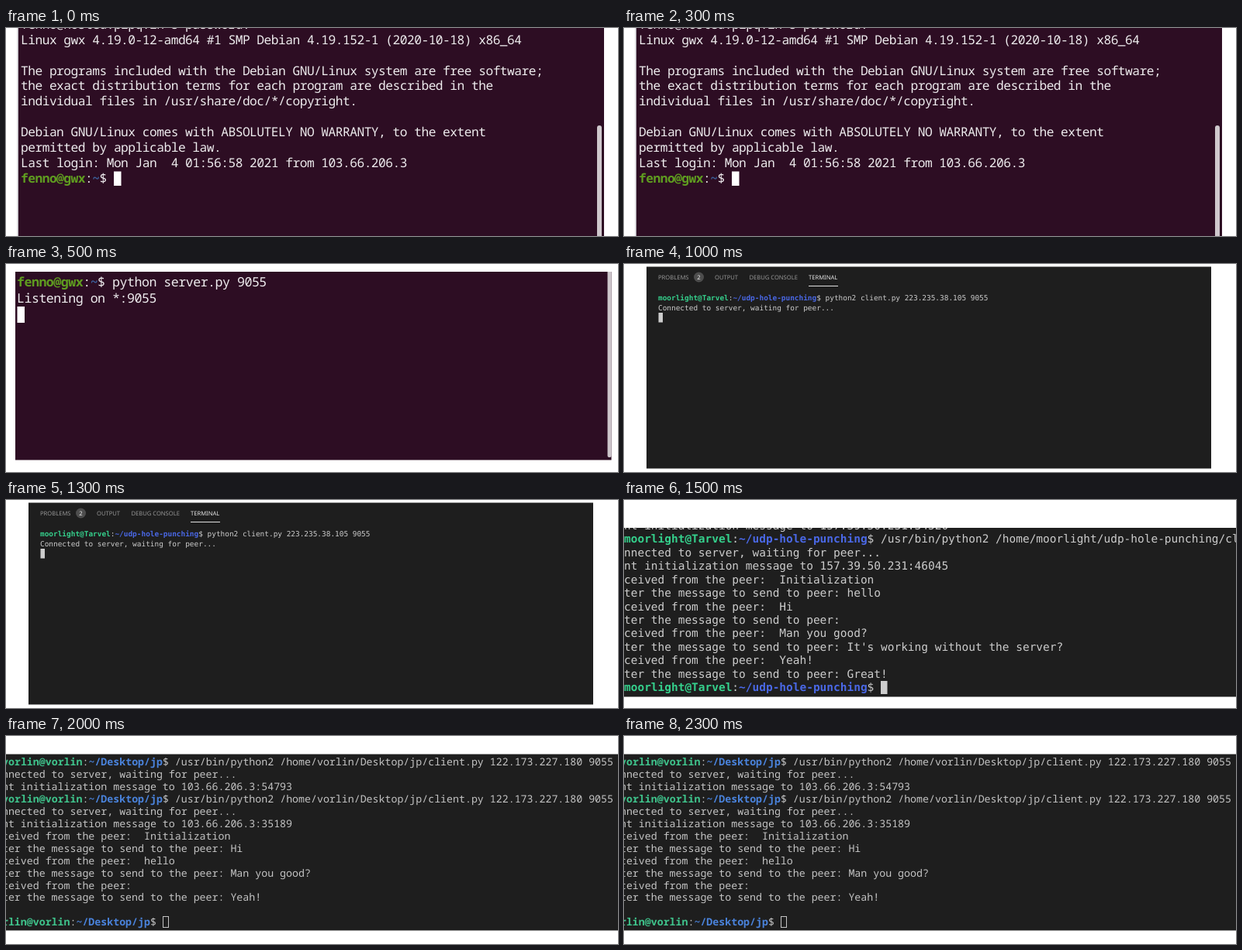
These frames come from a looping animation (789 px wide and 269 px high, 2500 ms). An HTML page with a canvas:

```html
<!DOCTYPE html>
<html lang="en">
<head>
<meta charset="utf-8">
<title>UDP hole punching demo</title>
<style>
  html, body { margin: 0; width: 100%; height: 100%; overflow: hidden; background: #fff; }
  canvas { display: block; }
</style>
</head>
<body>
<canvas id="stage" width="789" height="269"></canvas>
<script>
const ctx = document.getElementById('stage').getContext('2d');
const SCENE_MS = 500;
const NOTO = '"Noto Sans Mono", monospace';
const DEJAVU = '"DejaVu Sans Mono", monospace';

function box(color, x, y, w, h, radius = 0) {
  ctx.fillStyle = color;
  ctx.beginPath();
  ctx.roundRect(x, y, w, h, radius);
  ctx.fill();
}

// Draws one run of text and returns the x where the next run starts.
function write(text, x, y, font, color) {
  ctx.font = font;
  ctx.fillStyle = color;
  ctx.fillText(text, x, y);
  return x + ctx.measureText(text).width;
}

// A line is plain text, or { cmd, dx } for a coloured prompt followed by a command.
function terminal({
  family, size, tracking = 0, x, y, step, color, user, path, green, blue, lines
}) {
  const plain = `${size}px ${family}`;
  const bold = `bold ${plain}`;
  ctx.letterSpacing = `${tracking}px`;
  lines.forEach((line, i) => {
    const base = y + i * step;
    if (typeof line === 'string') {
      write(line, x, base, plain, color);
      return;
    }
    let at = write(user, x + (line.dx || 0), base, bold, green);
    at = write(':', at, base, plain, color);
    at = write(path, at, base, bold, blue);
    write('$ ' + line.cmd, at, base, plain, color);
  });
  ctx.letterSpacing = '0px';
}

const ubuntu = {
  family: NOTO, tracking: -0.5, color: '#eeecee', user: 'fenno@gwx', path: '~',
  green: '#5f9c20', blue: '#3d67a5'
};
const editor = {
  family: DEJAVU, color: '#cccccc', user: 'moorlight@Tarvel', path: '~/udp-hole-punching',
  green: '#35d08c', blue: '#4a68e6'
};

function login() {
  box('#c4c2c8', 14.5, 0, 2, 269);
  box('#2d0d23', 16, 0, 755, 269);
  box('#cfc8cd', 762, 126, 6, 150, 3);
  terminal({
    ...ubuntu, size: 16.22, x: 19, y: 0.8, step: 19.9,
    lines: [
      "fenno@hosted.plpq.in's password:",
      'Linux gwx 4.19.0-12-amd64 #1 SMP Debian 4.19.152-1 (2020-10-18) x86_64',
      '',
      'The programs included with the Debian GNU/Linux system are free software;',
      'the exact distribution terms for each program are described in the',
      'individual files in /usr/share/doc/*/copyright.',
      '',
      'Debian GNU/Linux comes with ABSOLUTELY NO WARRANTY, to the extent',
      'permitted by applicable law.',
      'Last login: Mon Jan  4 01:56:58 2021 from 103.66.206.3',
      { cmd: '' }
    ]
  });
  box('#fff', 139, 185.5, 9.5, 18.5);
}

function server() {
  box('#2d0d23', 12, 10, 768.5, 243.5);
  box('#cdc6cb', 775.5, 10, 5, 240, [0, 0, 2, 2]);
  terminal({
    ...ubuntu, size: 16.62, x: 14, y: 28.5, step: 21.3,
    lines: [{ cmd: 'python server.py 9055' }, 'Listening on *:9055']
  });
  box('#fff', 14.5, 55, 9.5, 21);
}

function client() {
  box('#1e1e1e', 29, 3.5, 728, 261);
  const tab = (name, x, color = '#969696') =>
    write(name, x, 20, '7.6px "Noto Sans", sans-serif', color);
  tab('PROBLEMS', 44);
  box('#4d4d4d', 90, 10.5, 13, 13, 6.5);
  tab('2', 94.3, '#f0f0f0');
  tab('OUTPUT', 117);
  tab('DEBUG CONSOLE', 161.5);
  tab('TERMINAL', 238, '#e7e7e7');
  box('#e0e0e0', 238, 28, 38, 1);
  terminal({
    ...editor, size: 9.44, x: 44, y: 47, step: 12.8,
    lines: [
      { cmd: 'python2 client.py 223.235.38.105 9055' },
      'Connected to server, waiting for peer...'
    ]
  });
  box('#cccccc', 44.5, 63, 5.5, 12.5);
}

function firstPeer() {
  box('#1e1e1e', 0, 36, 789, 218.5);
  ctx.save();
  ctx.beginPath();
  ctx.rect(0, 36, 789, 218.5);
  ctx.clip();
  terminal({
    ...editor, size: 14.47, x: 0, y: 37.8, step: 17.45,
    lines: [
      'nt initialization message to 157.39.50.231:34520',
      { cmd: '/usr/bin/python2 /home/moorlight/udp-hole-punching/client.py' },
      'nnected to server, waiting for peer...',
      'nt initialization message to 157.39.50.231:46045',
      'ceived from the peer:  Initialization',
      'ter the message to send to peer: hello',
      'ceived from the peer:  Hi',
      'ter the message to send to peer:',
      'ceived from the peer:  Man you good?',
      "ter the message to send to peer: It's working without the server?",
      'ceived from the peer:  Yeah!',
      'ter the message to send to peer: Great!',
      { cmd: '' }
    ]
  });
  ctx.restore();
  box('#cccccc', 331, 234, 8.5, 17);
}

function secondPeer() {
  box('#1e1e1e', 0, 23.5, 789, 228);
  const run = {
    cmd: '/usr/bin/python2 /home/vorlin/Desktop/jp/client.py 122.173.227.180 9055',
    dx: 16
  };
  terminal({
    family: NOTO, color: '#c4c4c4', user: 'vorlin@vorlin', path: '~/Desktop/jp',
    green: '#3fc48c', blue: '#4a83dc', size: 13.27, x: -21, y: 38, step: 15.95,
    lines: [
      run,
      'Connected to server, waiting for peer...',
      'Sent initialization message to 103.66.206.3:54793',
      run,
      'Connected to server, waiting for peer...',
      'Sent initialization message to 103.66.206.3:35189',
      'Received from the peer:  Initialization',
      'Enter the message to send to the peer: Hi',
      'Received from the peer:  hello',
      'Enter the message to send to the peer: Man you good?',
      'Received from the peer:',
      'Enter the message to send to the peer: Yeah!',
      '',
      { cmd: '' }
    ]
  });
  ctx.strokeStyle = '#c4c4c4';
  ctx.lineWidth = 1;
  ctx.strokeRect(202.5, 233.5, 7, 14);
}

const scenes = [login, server, client, firstPeer, secondPeer];
const start = performance.now();

function draw() {
  const elapsed = Math.max(0, performance.now() - start);
  ctx.textRendering = 'geometricPrecision';
  box('#fff', 0, 0, 789, 269);
  scenes[Math.floor(elapsed / SCENE_MS) % scenes.length]();
  requestAnimationFrame(draw);
}
draw();
</script>
</body>
</html>
```
